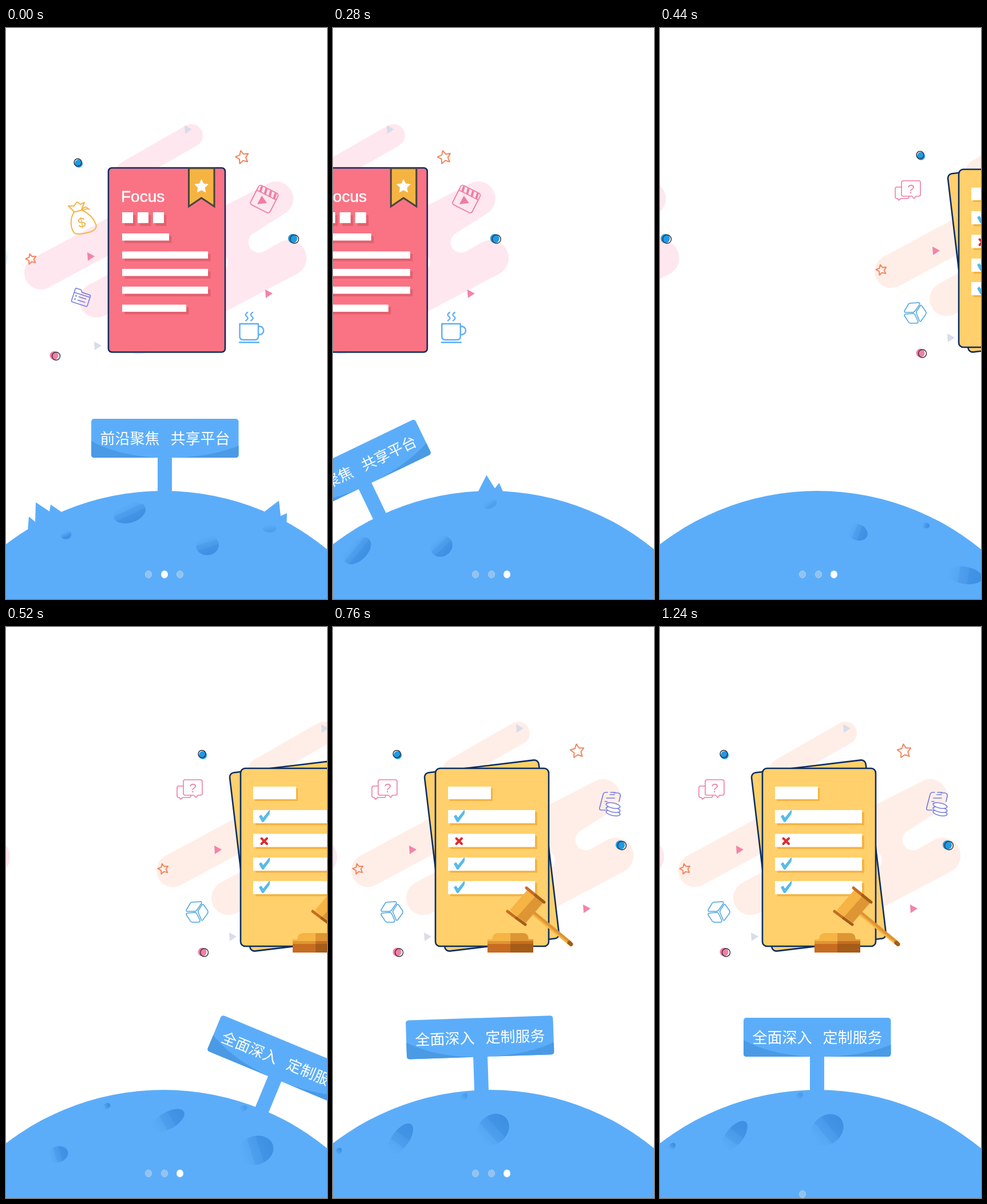
Animation, 561 px wide and 998 px high, one loop 1.28 s. Source, as an HTML page:

```html
<!DOCTYPE html>
<html lang="zh">
<head>
<meta charset="utf-8">
<title>Onboarding</title>
<style>
html, body { margin: 0; width: 100%; height: 100%; overflow: hidden; background: #fff; }
svg { display: block; width: 100vw; height: 100vh; }
.line { fill: none; stroke-linecap: round; stroke-linejoin: round; }
.sign { font: 26px "Noto Sans CJK SC", "Noto Sans CJK", "Noto Sans", sans-serif; fill: #fff; }
.focus { font: 28px "Liberation Sans", Arial, sans-serif; fill: #fff; stroke: #fff; stroke-width: .5; }
.mark { font-family: "Liberation Sans", Arial, sans-serif; text-anchor: middle; }
</style>
</head>
<body>
<svg id="stage" viewBox="0 0 561 998"></svg>
<script>
const LOOP = 1280, STEP = 40;
const SKY = '#5cadf9', NAVY = '#0c2c62', PINK = '#ef7ea2', INDIGO = '#757de0', ORANGE = '#f0865f';
const CX = 275, CY = 1261, R = 452;

// Shape helpers
const rect = (x, y, w, h, fill, extra = '') =>
  `<rect x="${x}" y="${y}" width="${w}" height="${h}" fill="${fill}" ${extra}/>`;
const path = (d, fill) => `<path d="${d}" fill="${fill}"/>`;
const line = (d, color, w = 1.6) => `<path class="line" d="${d}" stroke="${color}" stroke-width="${w}"/>`;
const capsule = (x1, y1, x2, y2, r, color) => line(`M${x1},${y1}L${x2},${y2}`, color, r * 2);
const circle = (x, y, r, fill, extra = '') => `<circle cx="${x}" cy="${y}" r="${r}" fill="${fill}" ${extra}/>`;
const at = (x, y, turn, body) => `<g transform="translate(${x} ${y}) rotate(${turn})">${body}</g>`;
const tri = (x, y, color) => path(`M${x - 6},${y - 7}l13,7l-12,8z`, color);

function starPath(x, y, r, turn, inner = 0.5) {
  let d = '';
  for (let i = 0; i < 10; i++) {
    const a = (i * 36 - 90 + turn) * Math.PI / 180, q = i % 2 ? r * inner : r;
    d += (i ? 'L' : 'M') + (x + q * Math.cos(a)).toFixed(1) + ',' + (y + q * Math.sin(a)).toFixed(1);
  }
  return d + 'z';
}
const star = (x, y, r, turn) => line(starPath(x, y, r, turn), ORANGE, 2);
const ball = (x, y, r, color, dx, dy) => circle(x, y, r, color) +
  circle(x + dx, y + dy, r - 0.5, 'none', 'stroke="#3a3440" stroke-width="1.5"');
const bar = (x, y, w, h, shade, dx, dy) =>
  rect(x + dx, y + dy, w, h, shade) + rect(x, y, w, h, '#fff');

const clouds = color =>
  capsule(324, 188, 212, 252, 20, color) +
  capsule(61, 428, 230, 337, 29, color) +
  capsule(158, 476, 240, 432, 30, color) +
  path('M360,322L462,270A30,30 0 0 1 489,323L434,358A18,18 0 0 0 450,391L480,374A31,31 0 0 1 508,430L360,508z', color) +
  circle(371, 410, 17, '#fff');

// Icons
const moneyBag = () => {
  const c = '#f5b544';
  return line('M119,322C111,333 113,350 119,358C124,362 134,360 145,357C153,355 160,350 157,343C153,333 145,324 134,319', c, 2) +
    line('M119,321L109,311L119,311L124,304L130,308L137,305L132,317', c, 2) +
    line('M118,322L134,318M133,317Q138,310 144,316M134,319Q140,315 146,317', c, 2) +
    at(134, 348, -12, `<text class="mark" font-size="24" fill="${c}">$</text>`);
};
const folder = () => at(131, 471, 18,
  line('M-14,10V-11q0,-2 2,-2h8l3,4h14q2,0 2,2V10q0,2 -2,2H-12q-2,0 -2,-2zM-14,-5H14', INDIGO, 1.6) +
  line('M-4,0H9M-4,6H9', INDIGO, 1.5) + circle(-9, 0, 1.4, INDIGO) + circle(-9, 6, 1.4, INDIGO));
const clapper = () => at(451.5, 299, 27,
  rect(-19, -19, 38, 38, 'none', `rx="4" stroke="${PINK}" stroke-width="1.8"`) +
  line('M-19,-8H19', PINK, 1.8) +
  [-14, -5, 4, 13].map(x => path(`M${x - 2},-18h4l2,10h-4z`, PINK)).join('')) +
  path('M447,293L456,306L439,308z', PINK);
const cup = () =>
  line('M408.500,517H441V539Q441,545 435,545H414.500Q408.500,545 408.500,539z', SKY, 2.4) +
  line('M441,521.500H443a7,7 0 0 1 0,14.500H441M408,549.500H442', SKY, 2.4) +
  [420, 429].map(x => line(`M${x + 2},497q-6,4 -1,7.500q4,3.500 -2,7`, SKY, 2.3)).join('');
const chat = () =>
  line('M79,278H71q-3,0 -3,3V295q0,3 3,3h1l2,3l4,-3H89q3,0 3,-4', PINK, 1.6) +
  rect(79.500, 267, 32.500, 27, '#fff', 'rx="3"') +
  line('M82,267H109q3,0 3,3V291q0,3 -3,3h-5l-3,4l-4,-4H82q-3,0 -3,-3V270q0,-3 3,-3z', PINK, 1.6) +
  `<text class="mark" x="95.500" y="289" font-size="22" fill="${PINK}">?</text>`;
const cube = () => line('M94,481L109,480Q112,481 110,484L103,494Q101,497 98,497L85,497Q83,496 85,493L91,483Q92,481 94,481z' +
  'M86,500L99,499Q102,499 103,502L108,513Q108,516 105,516L95,516Q92,516 90,512L84,503Q84,500 86,500z' +
  'M114,485L121,495Q123,498 121,501L113,512Q111,514 110,511L105,499Q104,497 106,494L112,485Q113,484 114,485z', '#4ba5df', 1.5);
const coins = () =>
  line('M476,320H469Q465,320 466,316L472,293Q473,289 477,289H480M491,290H498Q503,291 502,296L500,305', INDIGO, 1.7) +
  line('M485,289h8M484,293h8M478,299h14M475,305h4', INDIGO, 1.7) +
  [325, 319, 312].map(y => `<ellipse cx="489.500" cy="${y}" rx="12.500" ry="4.500" fill="#fff" stroke="${INDIGO}" stroke-width="1.600" transform="rotate(12 489 ${y})"/>`).join('');

// Scenes
function focusScene() {
  const shade = '#e2616f';
  const rows = [[359, 82], [390.5, 150], [421, 150], [452, 150], [483.5, 112]];
  return circle(-28, 401, 31, '#e2f6fd') + clouds('#fee7ef') +
    `<ellipse cx="232" cy="560" rx="18" ry="10.500" fill="#fee7ef"/>` +
    tri(318, 177, '#d9dcea') + tri(148, 399, '#f284a8') + tri(459, 464, '#f284a8') + tri(160, 555, '#d9dcea') +
    star(413, 226, 12, -14) + star(44, 404, 9.5, -14) +
    ball(127, 237, 7, '#1d9be6', -1.5, -2) + ball(501, 368, 8, '#1d9be6', 3, 1) + ball(84, 572.5, 7.5, '#f17fa4', 3.5, 1) +
    moneyBag() + folder() + clapper() + cup() +
    rect(179, 244.5, 204, 322, '#f97384', `rx="6" stroke="${NAVY}" stroke-width="2.600"`) +
    `<text class="focus" x="201" y="304">Focus</text>` +
    [203, 230, 257].map(x => bar(x, 322, 19, 19, shade, 4.5, 5)).join('') +
    rows.map(([y, w]) => bar(203, y, w, 12.5, shade, 4.5, 4.5)).join('') +
    `<path d="M319.500,245V312L341.500,297L364,312V245z" fill="#f5b442" stroke="#47443f" stroke-width="3"/>` +
    path(starPath(341.5, 277, 13, 0, 0.5), '#fff');
}

function gavel() {
  const lit = '#f5b443', mid = '#de9534', rust = '#c76c21', dark = '#a55c18';
  return path('M278,546Q279,535 288,535H310V546z', lit) + path('M310,535H333Q341,535 342,546H310z', mid) +
    rect(270, 546, 40, 4, lit) + rect(310, 546, 40, 4, mid) +
    rect(270, 549, 40, 5, mid) + rect(310, 549, 40, 5, rust) +
    rect(270, 554, 40, 15, rust) + rect(310, 554, 40, 15, dark) +
    line('M352,501L414,552', mid, 7) + line('M350,503L411,553', lit, 3) + line('M413,552L416,554.500', dark, 7) +
    path('M309,495L340,459L354,470L322,506z', lit) + path('M354,470L368,481L337,517L322,506z', mid) +
    line('M305,497L321,509', rust, 5) + line('M321,509L336,520', dark, 5) +
    line('M338,456L354,469', rust, 5) + line('M354,469L369,481', dark, 5);
}

function checkScene() {
  const sheet = '#ffd06b', shade = '#f4b342', ink = `stroke="${NAVY}" stroke-width="2.600"`;
  const tick = y => path(`M211,${y}l4,-3l3.500,5l10.500,-13l1.500,1l-1,6l-10.500,14l-2.500,0z`, '#58bbe9');
  return `<g transform="translate(0 -2.500)">${clouds('#ffeee7')}</g>` +
    tri(326, 177, '#d9dcea') + tri(139, 389, '#f284a8') + tri(443, 492, '#f284a8') + tri(165, 541, '#d9dcea') +
    star(427, 217, 12.5, -8) + star(44, 423, 9.5, -14) +
    ball(113, 224, 7, '#1d9be6', -1.5, -2) + ball(502, 381, 8, '#1d9be6', 3, 1) + ball(112, 568, 7.5, '#f17fa4', 3.5, 1) +
    chat() + cube() + coins() +
    at(277.5, 399.5, -6.8, rect(-100.5, -157, 201, 314, sheet, `rx="8" ${ink}`)) +
    rect(179, 247, 198, 311, sheet, `rx="8" ${ink}`) +
    bar(201, 279, 75, 22, shade, 3, 3) +
    [320, 361.5, 403, 444].map(y => bar(201, y, 152, 23, shade, 4, 3.5)).join('') +
    tick(331) + tick(414) + tick(455) +
    line('M215.500,369.500L225,379M225,369.500L215.500,379', '#dc2d30', 4) + gavel();
}

// Planet features
const crater = (x, y, rx, ry, turn, fill, alpha = 1) =>
  `<ellipse rx="${rx}" ry="${ry}" fill="url(#${fill})" opacity="${alpha}" transform="translate(${x} ${y}) rotate(${turn})"/>`;

function sign(x, a, b) {
  return rect(x + 116, 745, 25, 85, SKY) + rect(x, 683, 257.5, 68, SKY, 'rx="5"') +
    path(`M${x},722Q${x + 50},749 ${x + 122},751H${x + 5}Q${x},751 ${x},746z`, '#4a9ae6') +
    path(`M${x + 257.5},730Q${x + 215},748 ${x + 150},751H${x + 252.5}Q${x + 257.5},751 ${x + 257.5},746z`, '#4a9ae6') +
    `<text class="sign" x="${x + 15.5}" y="727">${a}</text><text class="sign" x="${x + 138.5}" y="727">${b}</text>`;
}

const land1 = () => sign(149, '前沿聚焦', '共享平台') +
  path('M37,890L40,854L51,863L52,829L76,845L78,833L100,848L110,870z', SKY) +
  path('M440,856L452,845L477,826L480,853L491,848L490,880z', SKY) +
  crater(216, 847, 29, 17.5, -18, 'down') + crater(105, 886, 9.5, 7.5, -15, 'down') +
  crater(352, 904, 20, 17.5, -8, 'down') + crater(461, 874, 12, 8, 0, 'down', 0.5);

const land2 = () => sign(146, '全面深入', '定制服务') +
  crater(292, 879, 31, 25, -40, 'along') + crater(130, 890, 32, 15, -52, 'along') +
  crater(21, 908, 7.5, 5, -50, 'along') + crater(243, 820, 8, 5, -40, 'along', 0.6) +
  crater(-25, 1018, 18, 14, -40, 'along');

const shades = `<stop offset=".050" stop-color="#5cadf9"/><stop offset=".350" stop-color="#55a6f3"/>
  <stop offset=".360" stop-color="#4f9fee"/><stop offset=".600" stop-color="#499aea"/>
  <stop offset=".620" stop-color="#4194e6"/><stop offset="1" stop-color="#3d8fe2"/>`;

document.getElementById('stage').innerHTML = `<defs>
  <linearGradient id="down" x1=".400" y1="0" x2=".600" y2="1">${shades}</linearGradient>
  <linearGradient id="along" x1="0" y1=".500" x2="1" y2=".500">${shades}</linearGradient></defs>
  <g id="page1">${focusScene()}</g><g id="page2">${checkScene()}</g>
  ${circle(CX, CY, R, SKY)}
  <g id="land1">${land1()}</g><g id="land2">${land2()}</g>
  ${[249, 277, 304].map((x, i) => `<ellipse id="dot${i}" cx="${x}" cy="955"/>`).join('')}`;

// Monotone cubic curve through [time, value] keys
function curve(keys) {
  const n = keys.length, d = [], m = [0];
  for (let i = 0; i < n - 1; i++) d[i] = (keys[i + 1][1] - keys[i][1]) / (keys[i + 1][0] - keys[i][0]);
  for (let i = 1; i < n - 1; i++) m[i] = d[i - 1] * d[i] > 0 ? 2 * d[i - 1] * d[i] / (d[i - 1] + d[i]) : 0;
  m[n - 1] = 0;
  return t => {
    if (t <= keys[0][0]) return keys[0][1];
    if (t >= keys[n - 1][0]) return keys[n - 1][1];
    let i = 0;
    while (t > keys[i + 1][0]) i++;
    const [t0, a] = keys[i], [t1, b] = keys[i + 1], h = t1 - t0, u = (t - t0) / h, v = 1 - u;
    return a * (1 + 2 * u) * v * v + h * m[i] * u * v * v + b * u * u * (3 - 2 * u) - h * m[i + 1] * u * u * v;
  };
}

const SPAN = 145;
const slideOut = curve([[0, 0], [160, -37], [360, -368], [480, -518]]);
const slideIn = curve([[160, 561], [280, 541], [360, 441], [520, 231], [600, 57], [720, 0]]);
const spin = curve([[0, 0], [160, -5.4], [360, -48], [520, -122.5], [600, -148.1], [760, -146.9], [1120, -SPAN]]);

const el = id => document.getElementById(id);
const put = (id, value) => el(id).setAttribute('transform', value);

function draw(t) {
  put('page1', `translate(${slideOut(t)} 0)`);
  put('page2', `translate(${slideIn(t)} 0)`);
  const turn = spin(t);
  put('land1', `rotate(${turn} ${CX} ${CY})`);
  put('land2', `rotate(${turn + SPAN} ${CX} ${CY})`);
  const active = t < 280 ? 1 : 2;
  for (let i = 0; i < 3; i++) {
    const dot = el('dot' + i), on = i === active;
    const fall = Math.max(0, (t - 1080 + i * 50) / 180);
    dot.setAttribute('rx', on ? 6 : 5.6);
    dot.setAttribute('ry', on ? 6.7 : 6.2);
    dot.setAttribute('fill', on ? '#fff' : '#92c3f0');
    dot.setAttribute('stroke', on ? 'none' : '#a9cff3');
    put('dot' + i, `translate(0 ${46 * fall * fall})`);
  }
}

function tick(now) {
  draw(Math.floor(now % LOOP / STEP) * STEP);
  requestAnimationFrame(tick);
}
draw(0);
requestAnimationFrame(tick);
</script>
</body>
</html>
```
